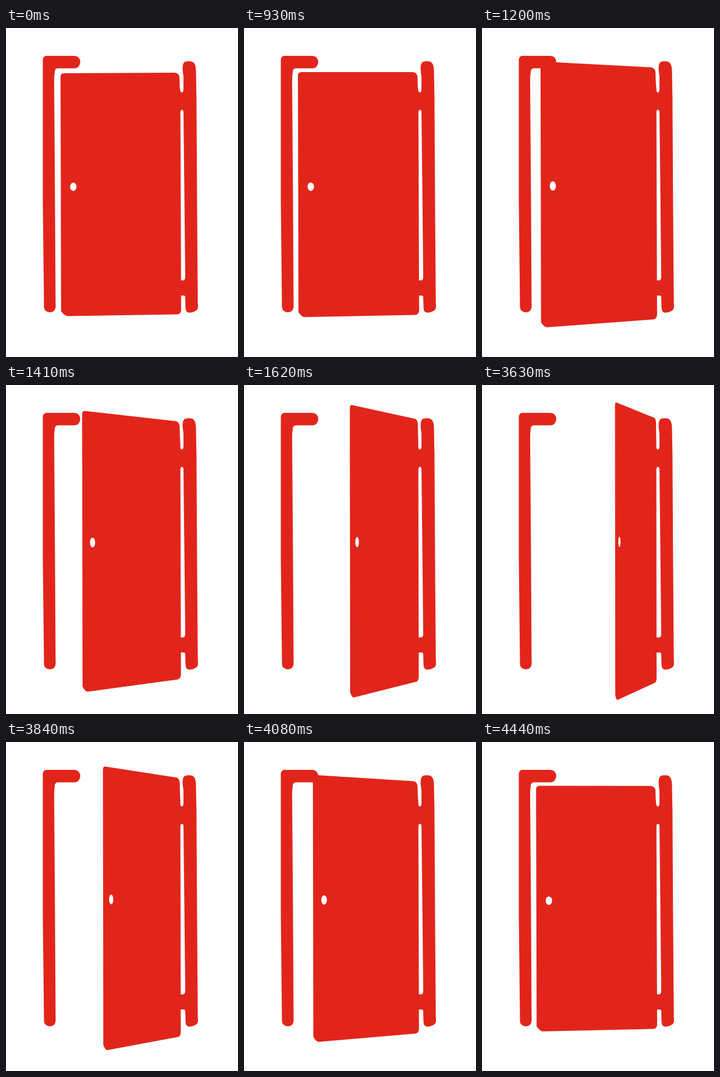
Write an HTML page with a canvas that moves like this. It is 400x567 px and loops after 4.47 s.

```html
<!DOCTYPE html>
<html lang="en">
<head>
<meta charset="utf-8">
<title>Door</title>
<style>
html, body { margin: 0; width: 100%; height: 100%; overflow: hidden; background: #fff; }
canvas { display: block; }
</style>
</head>
<body>
<canvas id="stage" width="400" height="567"></canvas>
<script>
const ctx = document.getElementById('stage').getContext('2d');
const RED = '#e2251b';
const LOOP = 4470, STEP = 30;
const STEPS = 30, TURN = 71.9;           // opening: steps and final angle in degrees
const WIDTH = 207, HINGE = 300.5, VX = 225, VY = 289;

const post = new Path2D(
  'M70 48H118Q128 49 128 59Q127 69 118 69.5H89Q84 70 84 76Q83 82 83 90L84.5 300' +
  'L85.5 475Q87 490 75 490Q66 489 65.5 481L63.5 300V55Q64 48 70 48Z');
const jamb = new Path2D(
  'M308 58.5Q316 56 322 58.5Q327 62 327.5 72L328.4 120L329.4 300L330.7 474Q332 483 329 486' +
  'Q322 491 315 490.5Q310 490 309.5 482L309 464Q309 461 306 461H300V435H306' +
  'Q309 434 309 429L307.7 300L306 146Q306 141 303.5 141Q301 141 301 144H300V108' +
  'Q302 112 304 111Q306 110 306 104V84L304.5 72Q304 62 308 58.5Z');

const steps = (t, start) => Math.floor((t - start) / STEP + 1e-6);

// Angle of the door and strength of the perspective at time t.
function pose(t) {
  if (t < 3630) {
    const n = Math.min(STEPS, Math.max(0, steps(t, 900)));
    return [TURN * n / STEPS, 0.225 - 0.0008 * n];
  }
  const n = steps(t, 3600);
  return [TURN * (1 - n / STEPS), 0.203 - 0.0023 * n];
}

function drawDoor(t) {
  const [deg, depth] = pose(t);
  const a = deg * Math.PI / 180, cos = Math.cos(a);
  const z = depth * Math.sin(a);
  const near = 1 / (1 - z), far = 1 / (1 - 0.44 * z);
  const left = VX + (301 - WIDTH * cos - VX) * near;

  const place = (u, y) => {
    const f = u / WIDTH;
    const lean = cos * (y - 78) / 418;
    return [left + (HINGE - left) * f + lean * (1 + 0.5 * f),
            VY + (y - VY) * (near + (far - near) * f)];
  };
  const line = (u, y) => ctx.lineTo(...place(u, y));
  const bend = (cu, cy, u, y) => ctx.quadraticCurveTo(...place(cu, cy), ...place(u, y));

  ctx.fillStyle = RED;
  ctx.beginPath();
  ctx.moveTo(...place(0, 84));
  bend(0, 78, 6, 78);
  line(197, 77);
  bend(203, 77, 205.5, 83);
  line(206, 100);
  line(207, 112);
  line(207, 487);
  bend(206, 493, 200, 493.5);
  line(11, 496.4);
  bend(6, 496.4, 0, 488);
  ctx.fill();

  const [hx, hy] = place(21.6, 273.7);
  ctx.fillStyle = '#fff';
  ctx.beginPath();
  ctx.ellipse(hx, hy, 5.5 * (HINGE - left) / WIDTH, 7.3 * near, 0, 0, 2 * Math.PI);
  ctx.fill();
}

function draw(now) {
  ctx.fillStyle = '#fff';
  ctx.fillRect(0, 0, 400, 567);
  drawDoor(now % LOOP);
  ctx.fillStyle = RED;
  ctx.fill(post);
  ctx.fill(jamb);
}

let start;
function frame(now) {
  start ??= now;
  draw(now - start);
  requestAnimationFrame(frame);
}
draw(0);
requestAnimationFrame(frame);
</script>
</body>
</html>
```
